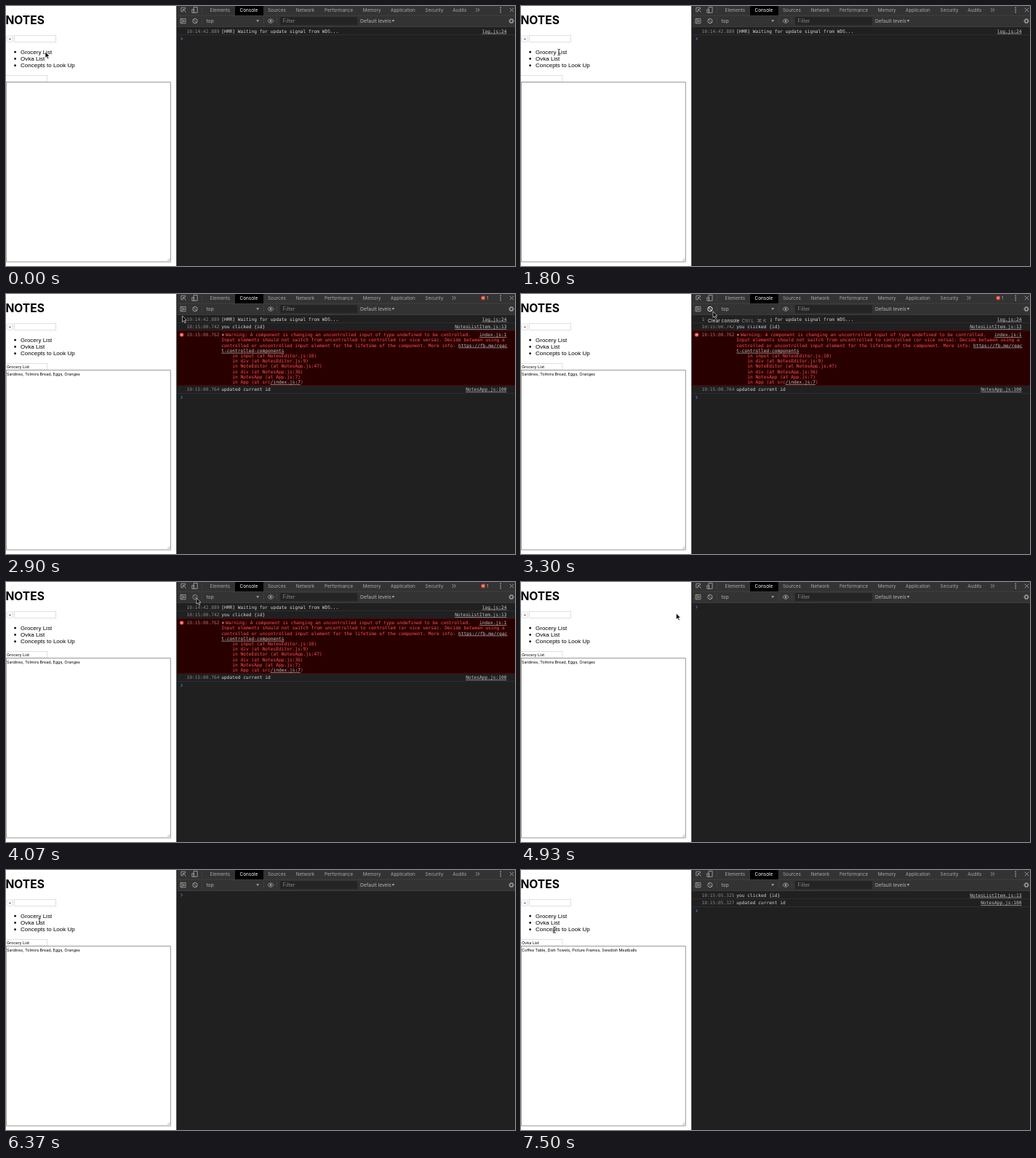
An HTML page for the animation above (8000 ms loop, 700 by 357 pixels).

```html
<!DOCTYPE html>
<html lang="en">
<head>
<meta charset="utf-8">
<title>Notes app with console</title>
<style>
  html, body { margin: 0; width: 100%; height: 100%; overflow: hidden; background: #fff; }
  svg { display: block; width: 700px; height: 357px; }
  text { white-space: pre; }
  .page { font: 8px "Liberation Sans", Arial, sans-serif; fill: #000; }
  .field { font: 5.4px Inter, sans-serif; fill: #000; }
  .tab { font: 6.4px Inter, sans-serif; fill: #a8a8a8; }
  .tool { font: 6.7px Inter, sans-serif; fill: #b4b4b4; }
  .mono { font: 6.22px "DejaVu Sans Mono", monospace; fill: #d5d5d5; }
  .time { fill: #888; }
  .error { fill: #ff5252; }
  .link { fill: #c4c4c4; text-decoration: underline; }
  .icon { fill: none; stroke: #a0a0a0; stroke-width: .9; }
  .box { fill: #fff; stroke: #d2d2d2; stroke-width: .7; }
</style>
</head>
<body>
<svg id="stage" viewBox="0 0 700 357"></svg>
<script>
const LOOP = 8000;
const FIRST_CLICK = 2230, CLEAR = 4100, SECOND_CLICK = 6800;
const MONO_X = 296.3, TIME_X = 248.5, LINE = 7.2;

const text = (x, y, cls, str, extra = '') => `<text x="${x}" y="${y}" class="${cls}" ${extra}>${str}</text>`;
const rect = (x, y, w, h, fill) => `<rect x="${x}" y="${y}" width="${w}" height="${h}" fill="${fill}"/>`;
const path = (d, attrs) => `<path d="${d}" ${attrs}/>`;
const icon = d => path(d, 'class="icon"');
const group = (id, body) => `<g id="${id}">${body}</g>`;
const underlined = str => `<tspan class="link">${str}</tspan>`;

const source = (y, str) => text(688.5, y, 'mono link', str, 'text-anchor="end"');
const logRow = (y, time, message, file) =>
  text(TIME_X, y + 2.2, 'mono time', time) + text(MONO_X, y + 2.2, 'mono', message) +
  source(y + 2.2, file) + rect(235, y + 5, 465, .6, '#383838');

const page = () => {
  const items = ['Grocery List', 'Ovka List', 'Concepts to Look Up'];
  return rect(0, 0, 235, 357, '#fff') +
    text(-.6, 24.7, '', 'NOTES', 'style="font:700 15.6px Inter,sans-serif"') +
    '<rect class="box" x="1" y="41" width="8.5" height="8" rx="1.5"/>' +
    text(5.2, 47, 'field', '+', 'text-anchor="middle"') +
    '<rect class="box" x="11.3" y="40.6" width="57.4" height="8.7"/>' +
    items.map((item, i) => `<circle cx="12.6" cy="${63.2 + i * 9.25}" r="1.35"/>` +
      text(20, 65.8 + i * 9.25, 'page', item)).join('') +
    '<rect class="box" x="-.3" y="95.4" width="57.1" height="8.8"/>' +
    '<rect x=".3" y="104.6" width="226" height="246.6" fill="#fff" stroke="#808080" stroke-width=".8"/>' +
    path('M221.8 350l3.6-3.6M223.8 350l1.6-1.6', 'stroke="#888" stroke-width=".6"') +
    text(1, 101.9, 'field', '', 'id="title"') + text(1, 111.6, 'field', '', 'id="body"');
};

const toolbar = () => {
  const tabs = [['Elements', 280.6], ['Sources', 360], ['Network', 398.7], ['Performance', 438],
    ['Memory', 490.7], ['Application', 529], ['Security', 576.6]];
  const down = (x, y) => path(`M${x - 2} ${y - 1.6}h4l-2 3.4z`, 'fill="#999"');
  const divider = x => rect(x, 16, .6, 9, '#4a4a4a');
  return rect(235, 0, 465, 28.6, '#333') + rect(235, 12.8, 465, .6, '#474747') +
    rect(235, 28.3, 465, .6, '#474747') + rect(315, 0, 39, 12.8, '#000') +
    tabs.map(([name, x]) => text(x, 7.8, 'tab', name)).join('') +
    text(321.5, 7.8, 'tab', 'Console', 'style="fill:#fff"') +
    group('audits', text(614.3, 7.8, 'tab', 'Audits')) +
    group('more', icon('M-2 3l2 2.4-2 2.4M.8 3l2 2.4-2 2.4')) +
    icon('M246.5 4V2.2h-5.6v5.6h2M243.6 4.6l4 4M243.6 7.6v-3h3') +
    icon('M258.2 9.2v-7.6h5v7.6zM255.8 9.2v-4.4h2.8v4.4z') +
    rect(269.5, 1.5, .6, 9, '#4a4a4a') +
    group('badge', '<circle cx="656.2" cy="5.4" r="2.8" fill="#e64a3c"/>' +
      path('M655.2 4.4l2 2m0-2l-2 2', 'stroke="#fff" stroke-width=".7"') + text(660.8, 7.7, 'tab', '1')) +
    [2.4, 5.4, 8.4].map(y => `<circle cx="680.2" cy="${y}" r=".85" fill="#a8a8a8"/>`).join('') +
    icon('M692.8 2.8l5.4 5.4m0-5.4l-5.4 5.4') +
    icon('M240 17.4h7v6.4h-7zM242 17.4v6.4M243.8 19.2l2 1.4-2 1.4z') +
    group('clear', '<circle cx="260" cy="20.6" r="3.2"/>' + '<path d="M257.8 18.4l4.4 4.4"/>') +
    divider(269.5) + text(275.5, 23, 'tool', 'top') + down(346.2, 20.5) + divider(354) +
    icon('M359.8 20.6q4.2-5.4 8.4 0q-4.2 5.4-8.4 0z') + '<circle cx="364" cy="20.6" r="1.4" fill="#a0a0a0"/>' +
    divider(372.3) + rect(377, 15.2, 106, 11, '#242424') +
    text(380.8, 23.1, 'tool', 'Filter', 'style="font-size:7px;fill:#888"') +
    text(487, 23, 'tool', 'Default levels') + down(532.5, 20.5) +
    '<circle cx="695" cy="20.6" r="2.2" class="icon" style="stroke-width:1.3"/>' +
    '<circle cx="695" cy="20.6" r="3.3" class="icon" stroke-dasharray="1.3 1.29"/>';
};

const warning = () => {
  const lines = [
    'Input elements should not switch from uncontrolled to controlled (or vice versa). Decide between using a',
    'controlled or uncontrolled input element for the lifetime of the component. More info: ' + underlined('https://fb.me/reac'),
    underlined('t-controlled-components'),
    '    in input (at NotesEditor.js:10)',
    '    in div (at NotesEditor.js:9)',
    '    in NoteEditor (at NotesApp.js:47)',
    '    in div (at NotesApp.js:36)',
    '    in NotesApp (at App.js:7)',
    '    in App (at src' + underlined('/index.js:7') + ')'
  ];
  return rect(235, 50.2, 465, 75.4, '#290000') +
    rect(235, 50, 465, .6, '#5c0000') + rect(235, 125.2, 465, .6, '#5c0000') +
    '<circle cx="241.6" cy="56" r="2.8" fill="#e64a3c"/>' +
    path('M240.6 55l2 2m0-2l-2 2', 'stroke="#fff" stroke-width=".7"') +
    text(TIME_X, 58.2, 'mono', '10:15:00.762', 'style="fill:#a37070"') +
    path('M297.4 54.2l3 1.9-3 1.9z', 'fill="#c08080"') +
    text(302, 58.2, 'mono error', 'Warning: A component is changing an uncontrolled input of type undefined to be controlled.') +
    source(58.2, 'index.js:1') +
    lines.map((line, i) => text(MONO_X, 58.2 + (i + 1) * LINE, 'mono error', line)).join('');
};

const tooltip = () => rect(253, 30, 90, 13, '#222') + text(257, 38.7, 'tool', 'Clear console', 'style="fill:#ddd"') +
  text(303.5, 38.7, 'tool', 'Ctrl L', 'style="fill:#888"') +
  text(324.5, 38.7, 'tool', '⌘ K', 'style="fill:#888;font-family:Inter,\'DejaVu Sans\',sans-serif"');

document.getElementById('stage').innerHTML = page() +
  rect(235, 0, 465, 357, '#202020') +
  group('startup', logRow(34.5, '10:14:42.889', '[HMR] Waiting for update signal from WDS...', 'log.js:24')) +
  group('firstLog', logRow(45, '10:15:00.742', 'you clicked {id}', 'NotesListItem.js:13') + warning() +
    logRow(131, '10:15:00.764', 'updated current id', 'NotesApp.js:100')) +
  group('secondLog', logRow(34.5, '10:15:05.325', 'you clicked {id}', 'NotesListItem.js:13') +
    logRow(45, '10:15:05.327', 'updated current id', 'NotesApp.js:100')) +
  group('prompt', path('M240.6-2l2 2-2 2', 'fill="none" stroke="#3d8bf0" stroke-width="1"')) +
  toolbar() + rect(234.3, 0, 1, 357, '#111') + group('tooltip', tooltip()) +
  group('arrow', path('M0 0v8.3l1.9-1.8 1.5 3.2 1.4-.6-1.5-3.1h2.6z', 'fill="#000" stroke="#fff" stroke-width=".6"')) +
  group('beam', ['stroke="#fff" stroke-width="1.5"', 'stroke="#000" stroke-width=".75"'].map(stroke =>
    path('M-1.8-4.2q1.8 0 1.8 1.2q0-1.2 1.8-1.2M0-3v6M-1.8 4.2q1.8 0 1.8-1.2q0 1.2 1.8 1.2M-1 .9h2', `fill="none" ${stroke}`)).join(''));

const ui = {};
document.querySelectorAll('[id]').forEach(el => ui[el.id] = el);
ui.clear.setAttribute('fill', 'none');

// Pointer waypoints: time, x, y
const route = [
  [0, 54, 63], [1730, 54, 63], [2030, 46.2, 65], [2370, 46.2, 65], [2520, 66, 60], [2700, 150, 43],
  [2860, 235, 31], [3030, 266, 27], [3300, 264, 24], [3700, 262, 22], [4670, 262, 22], [4800, 250, 28],
  [4930, 214, 43], [5100, 125, 60], [5300, 75.6, 65.6], [5570, 75.6, 65.6], [5900, 60, 65],
  [6370, 46, 70.3], [6400, 46, 70.3], [6570, 42.6, 73], [7030, 42.6, 73], [7500, 46, 82.3], [LOOP, 46, 82.3]
];

const clamp = v => Math.max(0, Math.min(1, v));
const show = (el, on) => el.setAttribute('display', on ? 'inline' : 'none');
const place = (el, x, y) => el.setAttribute('transform', `translate(${x.toFixed(2)} ${y.toFixed(2)})`);

function pointerAt(t) {
  const next = Math.max(1, route.findIndex(point => point[0] > t));
  const [t0, x0, y0] = route[next - 1], [t1, x1, y1] = route[next];
  const k = (t - t0) / (t1 - t0);
  return [x0 + (x1 - x0) * k, y0 + (y1 - y0) * k];
}

function draw(t) {
  const logged = t >= FIRST_CLICK && t < CLEAR;
  const reopened = t >= SECOND_CLICK;
  show(ui.startup, t < CLEAR);
  show(ui.firstLog, logged);
  show(ui.secondLog, reopened);
  show(ui.badge, logged);
  show(ui.audits, !logged);
  place(ui.more, logged ? 615.6 : 648.2, 0);
  place(ui.prompt, 0, logged ? 142 : reopened ? 56 : t < CLEAR ? 45 : 34.3);

  ui.title.textContent = reopened ? 'Ovka List' : t >= FIRST_CLICK ? 'Grocery List' : '';
  ui.body.textContent = reopened ? 'Coffee Table, Dish Towels, Picture Frames, Swedish Meatballs'
    : t >= FIRST_CLICK ? 'Sardines, Tolmira Bread, Eggs, Oranges' : '';

  ui.clear.setAttribute('stroke', t >= 3070 && t < 3870 ? '#f0f0f0' : t >= 3870 && t < CLEAR ? '#858585' : '#a0a0a0');
  ui.tooltip.setAttribute('opacity', clamp((t - 3200) / 80) * clamp((4000 - t) / 130));

  const [x, y] = pointerAt(t);
  const overText = x < 63 && t >= 1730;
  show(ui.arrow, !overText);
  show(ui.beam, overText);
  place(overText ? ui.beam : ui.arrow, x, y);
}

const start = performance.now();
function tick() {
  draw((performance.now() - start) % LOOP);
  requestAnimationFrame(tick);
}
draw(0);
requestAnimationFrame(tick);
</script>
</body>
</html>
```
